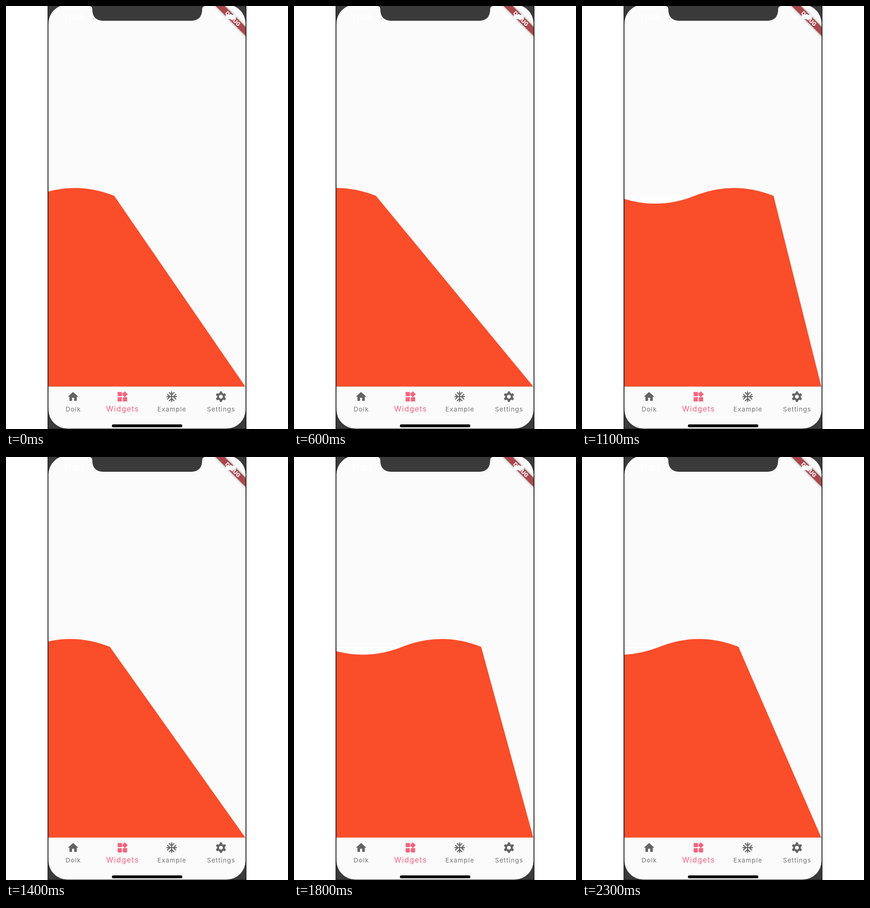
An HTML page for the animation above (2400 ms loop, 611 by 917 pixels).

```html
<!DOCTYPE html>
<html lang="en">
<head>
<meta charset="utf-8">
<style>
html, body { margin: 0; width: 100%; height: 100%; overflow: hidden; background: #fff; }
svg { display: block; width: 611px; height: 917px; }
text { font-family: Inter, Roboto, sans-serif; text-anchor: middle; }
.tab { fill: #646464; }
.tab text { font-size: 13.7px; letter-spacing: 1.1px; fill: #747474; }
.tab.on, .tab.on text { fill: #f4637e; }
.tab.on text { font-size: 16px; letter-spacing: 1.3px; }
</style>
</head>
<body>
<svg viewBox="0 0 611 917">
  <defs>
    <clipPath id="screen"><rect x="92" y="-3" width="427" height="919" rx="41"/></clipPath>
    <clipPath id="page"><rect x="92" y="0" width="427" height="825"/></clipPath>
    <filter id="blur" x="-20%" y="-100%" width="140%" height="300%"><feGaussianBlur stdDeviation="2.5"/></filter>
  </defs>

  <!-- phone -->
  <rect x="90" width="431" height="917" fill="#3a3a3a"/>
  <path d="M91 0V917M520 0V917M90 916.3H521" stroke="#262626" stroke-width="1.6"/>
  <rect x="92" y="-3" width="427" height="919" rx="41" fill="#fbfbfb"/>

  <g clip-path="url(#page)">
    <path id="gap" fill="#fff"/>
    <path id="wave" fill="#fa4d2a"/>
  </g>

  <!-- debug ribbon -->
  <g clip-path="url(#screen)">
    <g transform="translate(519 0) rotate(45)">
      <rect x="-60" y="32" width="120" height="13.6" opacity=".5" filter="url(#blur)"/>
      <rect x="-60" y="32" width="120" height="13.6" fill="#a8484c"/>
      <text x="0" y="43" font-size="11.6" font-weight="800" fill="#fff">DEBUG</text>
    </g>
  </g>

  <!-- status bar -->
  <g fill="#fff">
    <text x="147" y="30" font-size="18" font-weight="600">11:03</text>
    <path d="M452 20Q460 13 468 20L460 29Z"/>
    <rect x="476" y="19" width="22" height="9.5" rx="2.5"/>
  </g>
  <path d="M181 0Q187 1 187 7C187 24 196 32 212 32H400C416 32 425 24 425 7Q425 1 431 0Z" fill="#3a3a3a"/>

  <!-- navigation -->
  <path d="M92 825.3H519" stroke="#d4d0cf" stroke-width=".8"/>
  <g id="tabs"></g>
  <rect x="229.5" y="907" width="152.5" height="6.3" rx="3.1"/>
</svg>
<script>
const byId = id => document.getElementById(id);
const shape = d => `<path d="${d}"/>`;

const tooth = a => `<path d="M10 2h4l.7 4.2h-5.4z" transform="rotate(${a} 12 12)"/>`;
const gear = [0, 60, 120, 180, 240, 300].map(tooth).join('') +
  '<circle cx="12" cy="12" r="5.5" fill="none" stroke="#646464" stroke-width="3.9"/>';
const arm = a => `<path d="M12 12V2M7 3.6L12 8.6L17 3.6" transform="rotate(${a} 12 12)"/>`;
const flake = `<g fill="none" stroke="#646464" stroke-width="2">${[0, 90, 180, 270].map(arm).join('')}</g>`;

const tabs = [
  ['Dolk', shape('M10 20v-6h4v6h5v-8h3L12 3 2 12h3v8z')],
  ['Widgets', shape('M13 13v8h8v-8zM3 21h8v-8H3zM3 3v8h8V3zM16.66 1.69L11 7.34 16.66 13l5.66-5.66z')],
  ['Example', flake],
  ['Settings', gear]
];
byId('tabs').innerHTML = tabs.map(([label, icon], i) => {
  const x = 145.4 + i * 106.75, on = i === 1;
  return `<g class="tab ${on ? 'on' : ''}">
    <g transform="translate(${x - 13.67} 833.3) scale(1.139)">${icon}</g>
    <text x="${x + .5}" y="879">${label}</text></g>`;
}).join('');

// Wave travel: [tick, distance]; a tick is 100 ms and 36 units make one wavelength.
const travel = [[0, 15], [3, 27], [6, 45], [11, 70], [14, 86], [18, 105], [23, 134]];
const unit = 9.5, half = 171, level = 411.5, bulge = 34.2;

function distance(tick) {
  const i = Math.max(1, travel.findIndex(p => p[0] >= tick));
  const [t0, d0] = travel[i - 1], [t1, d1] = travel[i];
  return Math.round(d0 + (d1 - d0) * (tick - t0) / (t1 - t0));
}

function draw(now) {
  const tick = Math.floor(now % 2400 / 100);
  const edge = 92 + distance(tick) % 36 * unit;
  const dip = `M${edge - 2 * half} ${level}q${half / 2} ${bulge} ${half} 0`;
  byId('gap').setAttribute('d', dip + 'z');
  byId('wave').setAttribute('d', `${dip}q${half / 2} ${-bulge} ${half} 0L518.5 825H${edge - 2 * half}z`);
}

const start = performance.now();
function frame() {
  draw(performance.now() - start);
  requestAnimationFrame(frame);
}
frame();
</script>
</body>
</html>
```
